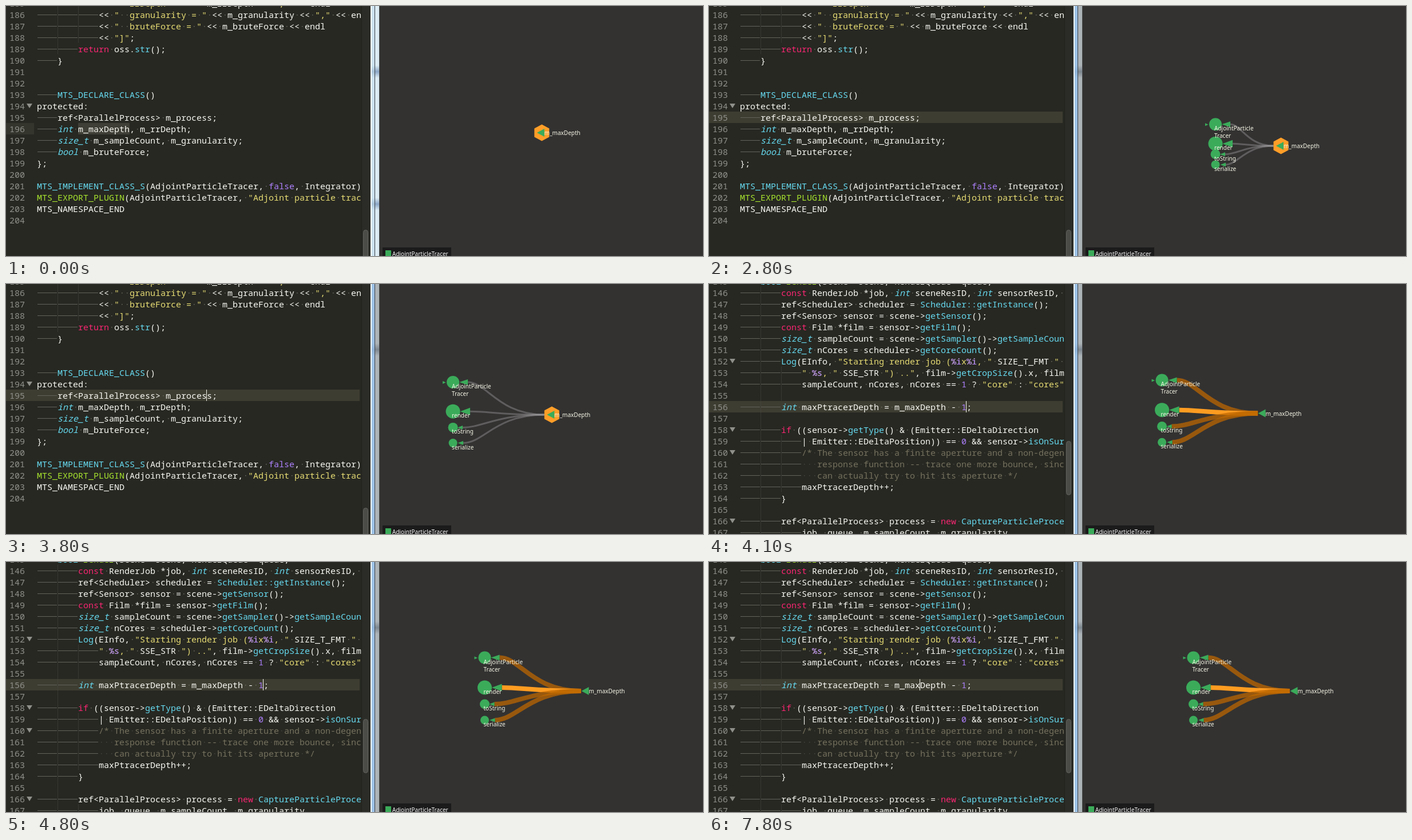
These frames come from a looping animation (1218 px wide and 438 px high, 8000 ms). An HTML page with a canvas:

```html
<!DOCTYPE html>
<html lang="en">
<head>
<meta charset="utf-8">
<title>Code and call graph</title>
<style>
html, body { margin: 0; width: 1218px; height: 438px; overflow: hidden; background: #333231; }
canvas { display: block; }
</style>
</head>
<body>
<canvas id="stage" width="1218" height="438"></canvas>
<script>
const ctx = document.getElementById('stage').getContext('2d');
const LOOP = 8000, STEP = 100;
const FOCUS = 700, EXPAND = 2200, JUMP = 4000;
const CELL = 9, ROW = 20, TAB = 36, LEFT = 54;
const CODE_FONT = "15px 'Noto Sans Mono', monospace";
const LABEL_FONT = "10px 'Noto Sans', sans-serif";
const GREEN = '#3bab5a', ORANGE = '#ff9e28';

// Each tab in the listings is one indent level.
const memberCode = {
  first: 185, folds: [194], thumb: [392, 60],
  lines: String.raw`			<< "  rrDepth = " << m_rrDepth << "," << endl
			<< "  granularity = " << m_granularity << "," << endl
			<< "  bruteForce = " << m_bruteForce << endl
			<< "]";
		return oss.str();
	}


	MTS_DECLARE_CLASS()
protected:
	ref<ParallelProcess> m_process;
	int m_maxDepth, m_rrDepth;
	size_t m_sampleCount, m_granularity;
	bool m_bruteForce;
};

MTS_IMPLEMENT_CLASS_S(AdjointParticleTracer, false, Integrator)
MTS_EXPORT_PLUGIN(AdjointParticleTracer, "Adjoint particle tracer");
MTS_NAMESPACE_END
`.split('\n')
};
const renderCode = {
  first: 145, folds: [152, 158, 160, 166], thumb: [275, 94],
  lines: String.raw`	bool render(Scene *scene, RenderQueue *queue,
		const RenderJob *job, int sceneResID, int sensorResID, int samplerResID) {
		ref<Scheduler> scheduler = Scheduler::getInstance();
		ref<Sensor> sensor = scene->getSensor();
		const Film *film = sensor->getFilm();
		size_t sampleCount = scene->getSampler()->getSampleCount();
		size_t nCores = scheduler->getCoreCount();
		Log(EInfo, "Starting render job (%ix%i, " SIZE_T_FMT " %s, "
			" %s, " SSE_STR ") ..", film->getCropSize().x, film->getCropSize().y,
			sampleCount, nCores, nCores == 1 ? "core" : "cores");

		int maxPtracerDepth = m_maxDepth - 1;

		if ((sensor->getType() & (Emitter::EDeltaDirection
			| Emitter::EDeltaPosition)) == 0 && sensor->isOnSurface())
			/* The sensor has a finite aperture and a non-degenerate
			   response function -- trace one more bounce, since
			   can actually try to hit its aperture */
			maxPtracerDepth++;
		}

		ref<ParallelProcess> process = new CaptureParticleProcess(
			job, queue, m_sampleCount, m_granularity,`.split('\n')
};

const TOKENS = /"[^"]*"|Scheduler::\w+|\w+|[^\w"]+/g;

function tokenColor(token, next) {
  if (token[0] === '"') return '#e6db74';
  if (/^(return|const|if|new)$/.test(token)) return '#f92672';
  if (/^(false|\d+)$/.test(token)) return '#ae81ff';
  if (/^(render|MTS_EXPORT_PLUGIN)$/.test(token) && next === '(') return '#a6e22e';
  if (/^(int|size_t|bool)$/.test(token) || (/^\w/.test(token) && next === '(')) return '#66d9ef';
  return '#f8f8f2';
}

function rect(color, x, y, w, h) {
  ctx.fillStyle = color;
  ctx.fillRect(x, y, w, h);
}

function text(str, x, y, color, font) {
  ctx.font = font;
  ctx.fillStyle = color;
  ctx.fillText(str, x, y);
}

function polygon(color, points) {
  ctx.fillStyle = color;
  ctx.beginPath();
  points.forEach(([x, y]) => ctx.lineTo(x, y));
  ctx.fill();
}

function drawCodeLine(line, top, guideDepth) {
  const indent = line.match(/^\t*/)[0].length;
  const code = line.slice(indent);
  for (let i = 0; i < indent; i++) rect('#62635a', LEFT + i * TAB + 1, top + 10, TAB - 2, 1);
  for (let i = 1; i < guideDepth; i++)
    for (let y = 0; y < ROW; y += 2) rect('#484942', LEFT + i * TAB, top + y, 1, 1);

  let x = LEFT + indent * TAB;
  const comment = /^(\/\*| {3})/.test(code);
  const dotColor = comment ? '#45463e' : '#6c6c61';
  const tokens = comment ? [code] : code.match(TOKENS) || [];
  tokens.forEach((token, i) => {
    const next = (tokens[i + 1] || '')[0];
    const style = /^(int|size_t|bool)$/.test(token) ? 'italic ' : '';
    text(token, x, top + 16, comment ? '#75715e' : tokenColor(token, next), style + CODE_FONT);
    if (token[0] === '"')
      for (const m of token.matchAll(/%[is]/g))
        text(m[0], x + m.index * CELL, top + 16, '#ae81ff', CODE_FONT);
    [...token].forEach((c, j) => {
      if (c === ' ') rect(dotColor, x + j * CELL + 4, top + 10, 1.5, 1.5);
    });
    x += token.length * CELL;
  });
}

const CLICKS = [FOCUS, JUMP, 7800];
const CARETS = [
  [350, 185, [[FOCUS, 1400], [1900, 2500], [2900, 3300], [3600, 4000]]],
  [449, 205, [[JUMP, 4500], [4700, 5200], [5400, 6200], [6500, 7100], [7300, 7600]]],
  [368, 205, [[7800, 8100]]]
];

function drawCaret(t) {
  for (const [x, y, spans] of CARETS)
    for (const [start, end] of spans) {
      if (t < start || t >= end) continue;
      const fading = t === end - STEP || (t === start && !CLICKS.includes(t));
      rect(fading ? 'rgba(248,248,240,.5)' : '#f8f8f0', x, y, 1, ROW);
    }
}

function drawEditor(t) {
  const page = t < JUMP ? memberCode : renderCode;
  rect('#272822', 0, 0, 637, 438);
  ctx.save();
  ctx.beginPath();
  ctx.rect(0, 0, 620.5, 438);
  ctx.clip();
  if (t < FOCUS) {
    rect('#34352d', 0, 205, 49, ROW);
    rect('#3f3f37', 126, 205, 90, ROW);
  } else {
    rect('#3e3d32', 0, t < JUMP ? 185 : 205, 618, ROW);
  }
  let depth = 0;
  page.lines.forEach((line, i) => {
    const top = i * ROW - 15, number = page.first + i;
    if (line) depth = line.match(/^\t*/)[0].length;
    const blankTop = !line && page === memberCode;
    drawCodeLine(line, top, blankTop ? 0 : depth);
    text(String(number), 6, top + 16, '#8f908a', CODE_FONT);
    if (page.folds.includes(number))
      polygon('#8f908a', [[36, top + 6], [46, top + 6], [41, top + 14]]);
  });
  drawCaret(t);
  ctx.restore();

  rect('#2b2c28', 621, 0, 16, 438);
  rect('#20211c', 621, 0, 1, 438);
  const [y, h] = page.thumb;
  ctx.beginPath();
  ctx.roundRect(624.5, y + .5, 8, h, 4);
  ctx.fillStyle = '#4b4c48';
  ctx.fill();
  ctx.strokeStyle = '#61625d';
  ctx.lineWidth = 1;
  ctx.stroke();
}

// Vertical strip of glass with soft blots.
function glass(x, w, color, blot, centers) {
  const g = ctx.createLinearGradient(0, 0, 0, 438);
  for (const y of centers) {
    g.addColorStop((y - 11) / 438, color);
    g.addColorStop(y / 438, blot);
    g.addColorStop((y + 11) / 438, color);
  }
  rect(g, x, 0, w, 438);
}

function drawWindowEdges(t) {
  const focused = t >= FOCUS;
  const blots = focused ? [115] : [115, 347];
  rect('#f0f5f7', 637, 0, 2, 438);
  glass(639, 5, focused ? '#9dc2e6' : '#cbe2f0', focused ? '#90b4da' : '#a9c4da', blots);
  rect('#3a4046', 644, 0, 1, 438);
  glass(645, 7, focused ? '#adb4b8' : '#dcecf4', focused ? '#7d878f' : '#8ba6c6', blots);
  rect('#4a4c4d', 652, 0, 1, 438);
}

// Smooth keyframe curve that never overshoots its keys.
function track(keys) {
  const rate = i => (keys[i + 1][1] - keys[i][1]) / (keys[i + 1][0] - keys[i][0]);
  const slopes = keys.map((k, i) => {
    if (i === 0 || i === keys.length - 1) return 0;
    const a = rate(i - 1), b = rate(i);
    return a * b <= 0 ? 0 : 2 * a * b / (a + b);
  });
  return t => {
    if (t <= keys[0][0]) return keys[0][1];
    const i = keys.findIndex(k => k[0] > t) - 1;
    if (i < 0) return keys[keys.length - 1][1];
    const [t0, a] = keys[i], [t1, b] = keys[i + 1];
    const d = t1 - t0, u = (t - t0) / d, v = 1 - u;
    return v * v * (1 + 2 * u) * a + u * u * (3 - 2 * u) * b
      + d * u * v * (v * slopes[i] - u * slopes[i + 1]);
  };
}

const hubX = track([[2100, 936.3], [2400, 958], [2800, 999.5], [3000, 993], [3800, 953.8],
  [4300, 982.5], [4800, 1014], [5500, 1023], [5700, 1024]]);
const hubY = track([[2100, 222], [2400, 230], [2800, 245], [3000, 244], [3800, 229], [4300, 226]]);
const spread = track([[2100, 0], [2400, .18], [2800, .645], [3000, .77], [3400, .91],
  [3800, .973], [4300, 1]]);

// dy: offset when fully spread; tip/base/half: arrow geometry beside the node
const SPREAD_X = 177.5;
const NODES = [
  { label: ['AdjointParticle', 'Tracer'], dy: -58.5, r: 11, tip: 11, base: 26, half: 5, entry: true },
  { label: ['render'], dy: -6, r: 12.5, tip: 12.5, base: 30, half: 6.5, active: true },
  { label: ['toString'], dy: 23, r: 8.5, tip: 8, base: 17, half: 3.5 },
  { label: ['serialize'], dy: 51, r: 7.5, tip: 8.5, base: 18, half: 3.5 }
];

function drawEdge(x0, y0, x1, y1, color, width) {
  const w = x0 - x1;
  ctx.strokeStyle = color;
  ctx.lineWidth = width;
  ctx.beginPath();
  ctx.moveTo(x0, y0);
  ctx.bezierCurveTo(x0 - w * .6, y0, x1 + w * .25, y1, x1, y1);
  ctx.stroke();
}

function arrow(tip, base, y, half) {
  polygon(GREEN, [[tip, y], [base, y - half], [base, y + half]]);
}

function drawGraph(t) {
  rect('#333231', 653, 0, 565, 438);
  const x = hubX(t), y = hubY(t), s = spread(t), selected = t >= JUMP;
  const label = (str, lx, ly) => text(str, lx, ly, '#f7f6e6', LABEL_FONT);
  const nodes = t < EXPAND ? [] : NODES.map(n => ({ ...n, x: x - SPREAD_X * s, y: y + n.dy * s }));

  for (const n of nodes) {
    const color = !selected ? 'rgba(160,158,160,.4)' : n.active ? '#ff9c21' : 'rgba(190,104,0,.73)';
    drawEdge(x - (selected ? 9 : 13), y, n.x + n.base, n.y, color, selected ? 8 : 3);
  }
  for (const n of nodes) {
    ctx.fillStyle = GREEN;
    ctx.beginPath();
    ctx.arc(n.x, n.y, n.r, 0, Math.PI * 2);
    ctx.fill();
    arrow(n.x + n.tip, n.x + n.base, n.y, n.half);
    if (n.entry) arrow(n.x - 12.5, n.x - 18, n.y + .5, 2.5);
  }
  if (!selected)
    polygon(ORANGE, [[x, y - 14.5], [x + 13, y - 7.5], [x + 13, y + 7.5],
      [x, y + 14.5], [x - 13, y + 7.5], [x - 13, y - 7.5]]);
  arrow(x - 8.5, x + 4.5, y, 7);
  for (const n of nodes)
    n.label.forEach((str, i) => label(str, n.x - 2, n.y + 11 + 13 * i));
  label('m_maxDepth', x + 4.5, y + 4);

  rect('#1b1b1b', 658, 423, 120, 15);
  rect(GREEN, 663, 428, 10, 10);
  text('AdjointParticleTracer', 675, 438, '#f5f5f5', LABEL_FONT);
}

function frame() {
  const t = Math.floor((performance.now() % LOOP) / STEP) * STEP;
  drawEditor(t);
  drawGraph(t);
  drawWindowEdges(t);
  requestAnimationFrame(frame);
}

frame();
</script>
</body>
</html>
```
